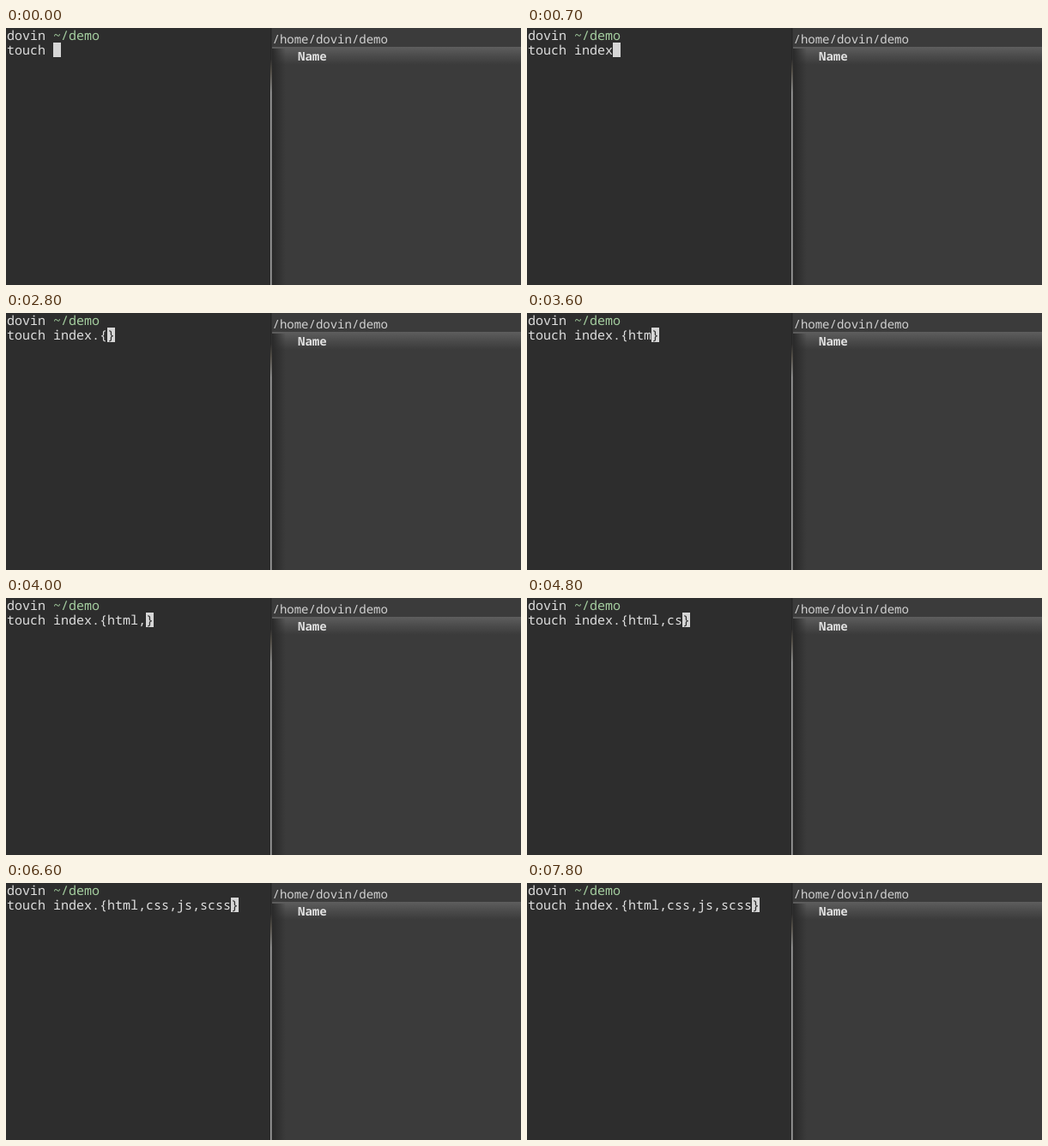
These frames come from a looping animation (600x300 px, 8000 ms). An HTML page:

```html
<!DOCTYPE html>
<html lang="en">
<head>
<meta charset="utf-8">
<title>Typing a touch command</title>
<style>
  html, body { margin: 0; width: 100%; height: 100%; overflow: hidden; background: #2d2d2d; }
  svg { display: block; }
  text { font: 15px "Noto Sans Mono", "DejaVu Sans Mono", monospace; fill: #dedede; white-space: pre; text-rendering: geometricPrecision; }
  .path { fill: #a5cfa0; }
  .pane { font-size: 14px; fill: #d2d2d2; }
  .head { font-weight: bold; fill: #e0e0e0; }
  #under { fill: #2d2d2d; }
</style>
</head>
<body>
<svg width="600" height="300" viewBox="0 0 600 300">
  <defs>
    <linearGradient id="header" x2="0" y2="1">
      <stop stop-color="#5e5e5e"/><stop offset=".5" stop-color="#4b4b4b"/><stop offset="1" stop-color="#3b3b3b"/>
    </linearGradient>
    <linearGradient id="shade">
      <stop stop-color="#292929"/><stop offset="1" stop-color="#292929" stop-opacity="0"/>
    </linearGradient>
    <linearGradient id="edge" x2="0" y2="1">
      <stop offset=".12" stop-color="#262626"/><stop offset=".17" stop-color="#5b564c"/><stop offset=".25" stop-color="#a4a4a4"/>
    </linearGradient>
  </defs>

  <rect width="600" height="300" fill="#2d2d2d"/>
  <rect x="309" width="291" height="300" fill="#3b3b3b"/>
  <rect x="310" y="22" width="290" height="21" fill="url(#header)"/>
  <rect x="310" y="24" width="16" height="276" fill="url(#shade)"/>
  <rect x="308" width="1.5" height="300" fill="url(#edge)"/>
  <text class="pane" x="310.5" y="18">/home/dovin/demo</text>
  <text class="pane head" x="340" y="38">Name</text>

  <text x="1" y="14">dovin <tspan class="path">~/demo</tspan></text>
  <text id="line" x="1" y="31"></text>
  <g id="cursor">
    <rect y="17" width="9" height="17" fill="#d6d6d6"/>
    <text id="under" y="31"></text>
  </g>
</svg>
<script>
  const $ = id => document.getElementById(id);
  const prompt = "touch ", typed = "index.{html,css,js,scss";
  const keys = [200, 300, 400, 500, 700, 1600, 2000, 3300, 3400, 3600, 3700, 4000,
    4700, 4800, 5000, 5100, 5400, 5500, 5700, 6200, 6300, 6400, 6600];
  const closeAt = 2100, stepBackAt = 2800;
  const hidden = [[1300, 1600], [4600, 4700], [7200, 7800]];

  function draw(t) {
    const text = prompt + typed.slice(0, keys.filter(k => k <= t).length);
    const closed = t >= closeAt, inside = t >= stepBackAt;
    const col = text.length + (closed && !inside ? 1 : 0);
    $("line").textContent = text + (closed ? "}" : "");
    $("under").textContent = inside ? "}" : "";
    $("cursor").setAttribute("transform", `translate(${1 + 9 * col})`);
    $("cursor").style.display = hidden.some(([a, b]) => t >= a && t < b) ? "none" : "";
  }

  const start = performance.now();
  function frame() {
    draw((performance.now() - start) % 8000);
    requestAnimationFrame(frame);
  }
  frame();
</script>
</body>
</html>
```
